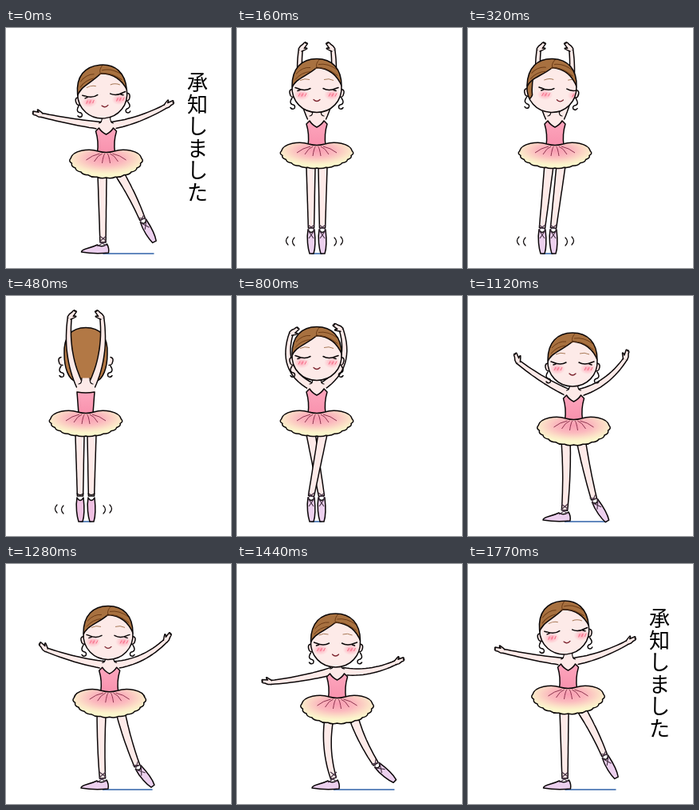
Animation of 282x300 px, one loop 1.93 s. Source, as an HTML page:

```html
<!DOCTYPE html>
<html lang="ja">
<head>
<meta charset="utf-8">
<title>承知しました</title>
<style>
  html, body { margin: 0; width: 100%; height: 100%; overflow: hidden; background: #fff; }
  svg { display: block; width: 100vw; height: 100vh; }
  text { font: 400 26px "Noto Sans CJK JP", "Noto Sans CJK", sans-serif; text-anchor: middle; fill: #000; }
  .ink { stroke: #0b0708; stroke-width: 1.5; stroke-linecap: round; stroke-linejoin: round; }
  .thin { fill: none; stroke: #0b0708; stroke-width: 1.2; stroke-linecap: round; }
  .lace { fill: none; stroke: #4a3648; stroke-width: 1.2; }
  .lip { fill: none; stroke: #7d2630; stroke-width: 1.3; stroke-linecap: round; }
</style>
</head>
<body>
<svg id="stage" viewBox="0 0 282 300">
  <defs>
    <radialGradient id="skirt" cx=".5" cy=".3" r=".56">
      <stop offset="0" stop-color="#f99cb2"/>
      <stop offset=".45" stop-color="#fbb9be"/>
      <stop offset=".8" stop-color="#fce3c8"/>
      <stop offset="1" stop-color="#fcf6cc"/>
    </radialGradient>
    <radialGradient id="blush">
      <stop offset="0" stop-color="#ff9fb2"/>
      <stop offset="1" stop-color="#ffb0be" stop-opacity="0"/>
    </radialGradient>
    <linearGradient id="top" x2="0" y2="1">
      <stop offset="0" stop-color="#fda6bd"/>
      <stop offset="1" stop-color="#f891ad"/>
    </linearGradient>
    <clipPath id="face"><path/></clipPath>
  </defs>
</svg>
<script>
const SKIN = '#fdeae8', HAIR = '#a87140', SHOE = '#ecd0ee';
const FACE = 'M-31 0C-31-22-19-34 0-34S31-22 31 0C32 19 18 33 0 33S-32 19-31 0Z';
const UPPER = 36, FORE = 38, SHOE_LENGTH = 32, LOOP = 1930;

// arms: upper, fore and hand angles in degrees above the horizontal, then stretch
// legs: hip offset, ankle x, ankle y, knee bend; toe turns the right foot
const reach = {
  head: [120.5, 80, -5], waist: [125.5, 154], drop: 35, turn: 2,
  arms: [[8, 12, 15, 1.02], [13, 26, 28, .98]],
  legs: [[-5, 121.5, 268, 0], [16, 171, 239, 2]], toe: -27, flat: true, label: true
};
const pointe = {
  head: [100, 72.5, 0], waist: [100, 145], drop: 32,
  arms: [[70, 92, 130, 1.2], [70, 92, 130, 1.2]],
  legs: [[-7.5, 93, 250, 0], [7.5, 107, 250, 0]], toe: 0, wobble: true
};
const crossed = {
  ...pointe, wobble: false,
  arms: [[39, 98, 142, 1.1], [44, 98, 146, 1.14]],
  legs: [[-7.5, 106, 250, 0], [7.5, 93, 250, 0]]
};
const open = {
  head: [131, 80, 0], waist: [132.5, 153], drop: 35,
  arms: [[27, 36, 70, 1], [22, 50, 75, 1]],
  legs: [[-10, 121, 268, 2], [9, 158, 254, -1]], toe: -30, flat: true
};
const bow = {
  head: [123.5, 96, 0], waist: [125.5, 166], drop: 35,
  arms: [[-14, -7, 8, 1.05], [-2, 20, 24, .93]],
  legs: [[-10, 121, 268, -6], [21, 174, 250, -3]], toe: -47, flat: true
};

function mix(a, b, k) {
  if (typeof b === 'number') return (a ?? b) + (b - (a ?? b)) * k;
  if (Array.isArray(b)) return b.map((v, i) => mix(a[i], v, k));
  if (typeof b !== 'object') return b;
  return Object.fromEntries(Object.keys(b).map(n => [n, mix(a[n], b[n], k)]));
}

const steps = [
  [0, reach], [160, pointe], [320, { ...pointe, turn: 11, waist: [109, 145], head: [105, 72.5, 2] }],
  [480, { ...pointe, back: true }], [640, { ...pointe, turn: -11 }], [800, crossed],
  [960, mix(crossed, open, .45)], [1120, open], [1280, mix(open, bow, .4)], [1440, bow], [1770, reach]
];

const f = v => v.toFixed(1);
const rad = deg => deg * Math.PI / 180;
const path = (d, fill = 'none', cls = '', more = '') => `<path d="${d}" fill="${fill}" class="${cls}" ${more}/>`;
const place = (x, y, rot, body) => `<g transform="translate(${f(x)} ${f(y)}) rotate(${f(rot)})">${body}</g>`;
const flip = (side, body) => `<g transform="scale(${side} 1)">${body}</g>`;

// Tapered limb bent smoothly through its middle joint
function limb(a, joint, b, w0, w1) {
  const ctrl = [0, 1].map(i => 2 * joint[i] - (a[i] + b[i]) / 2);
  const soft = [0, 1].map(i => (joint[i] + ctrl[i]) / 2);
  const left = [], right = [];
  for (let t = 0; t <= 1; t += 1 / 16) {
    const at = i => (1 - t) ** 2 * a[i] + 2 * t * (1 - t) * soft[i] + t * t * b[i];
    const slope = i => (1 - t) * (soft[i] - a[i]) + t * (b[i] - soft[i]);
    const w = (w0 + (w1 - w0) * t) / Math.hypot(slope(0), slope(1));
    const nx = -slope(1) * w, ny = slope(0) * w;
    left.push(f(at(0) + nx) + ' ' + f(at(1) + ny));
    right.unshift(f(at(0) - nx) + ' ' + f(at(1) - ny));
  }
  return path('M' + left.concat(right).join('L'), SKIN, 'ink');
}

function arm([wx, wy], side, [upper, fore, hand, k]) {
  const step = ([x, y], deg, len) => [x + side * Math.cos(rad(deg)) * len * k, y - Math.sin(rad(deg)) * len * k];
  const shoulder = [wx + side * 7, wy - 32];
  const elbow = step(shoulder, upper, UPPER), wrist = step(elbow, fore, FORE);
  const palm = path('M-1-2.5C2-4 4-5 6-5.500Q7-4.500 4-2.500L11-2Q12-.5 10 0L11 1Q10 2.500 7 2L3 3-1 2.500', SKIN, 'ink');
  return limb(shoulder, elbow, wrist, 4.6, 2.5) +
    place(...wrist, 0, flip(side, place(0, 0, -hand, palm)));
}

function pointShoe(back) {
  const shoe = path(`M-4 2C-6 13-4 26-2 ${SHOE_LENGTH}H3C6 23 5 11 4 2Q0 9-4 2Z`, back ? '#efc0e2' : SHOE, 'ink');
  return shoe + (back ? path('M-4-3Q0 0 4-3', 'none', 'thin')
    : path('M-4-4L4 2M4-4L-4 2M-4 3L3 13M4 3L-3 13', 'none', 'lace'));
}

const flatShoe = () => path('M-27 12C-27 8-17 8-7 3Q-1 7 5 2Q8 7 7 13Q-10 15-27 12Z', SHOE, 'ink') +
  path('M-4-8L4-2M4-8L-4-1M-4-1L4 4M4-2L-7 5', 'none', 'lace');

function leg([wx, wy], [hip, x, y, bend], toe, shoe) {
  const a = [wx + hip, wy + 27];
  const knee = [(a[0] + x) / 2 + bend, (a[1] + y) / 2];
  return limb(a, knee, [x, y], 5.6, 3.6) + place(x, y, toe, shoe);
}

function tutu(drop) {
  const n = 12, r = 44.5, depth = drop - 11;
  const rim = (i, k) => {
    const a = Math.PI * i / n;
    return f(-r * k * Math.cos(a)) + ' ' + f(9 + depth * k * Math.sin(a));
  };
  let d = `M-10 0C-22-4-42-1-${r} 9`, folds = '';
  for (let i = 1; i <= n; i++) d += `Q${rim(i - .5, 1.08)} ${rim(i, 1)}`;
  for (let x = -25; x <= 25; x += 10) folds += `M${f(x * .32)} 3Q${f(x * .7)} 5 ${x} ${f(16 - Math.abs(x) * .2)}`;
  return path(d + 'C42-1 22-4 10 0Q0 3-10 0Z', 'url(#skirt)', 'ink') + path(folds, 'none', '', 'stroke="#8f3550"');
}

const bodice = back => path(back ? 'M-11-25Q0-23 11-25L9 2Q0 4-9 2Z'
  : 'M-13-25L-9-29Q-6-24 0-21Q6-24 9-29L13-25Q9-12 11 2Q0 5-11 2Q-9-12-13-25Z', 'url(#top)', 'ink');

function chest(neck) {
  const side = `M-5 ${f(-neck)}Q-5-35-9-35`;
  return path(`M-5 ${f(-neck)}L-6-35-12-30-12-22H12V-30L6-35 5 ${f(-neck)}Z`, SKIN) +
    path(side, 'none', 'thin') + flip(-1, path(side, 'none', 'thin'));
}

function head(turn, back) {
  const pair = draw => draw(1) + draw(-1);
  const ears = pair(s => flip(s, path('M-31 4Q-36 5-33 12Q-32 14-29 14', SKIN, 'ink') +
    path('M-31 15Q-35 21-31 23Q-26 24-28 28Q-31 30-33 27', 'none', 'ink')));
  if (back) return ears + path('M-27 0C-28-22-18-33 0-33S28-22 27 0C27 16 22 33 12 34H-12C-22 33-27 16-27 0Z', '#b27845', 'ink');

  const features = pair(s => flip(s, '<ellipse cx="-19" cy="11" rx="10" ry="7" fill="url(#blush)"/>' +
    path('M-24 3Q-15 7-8 3M-24 3L-27 2M-21 5L-24 6', 'none', 'ink') + path('M-21-7Q-15-10-9-8', 'none', '', 'stroke="#a87a58"')) +
    path([-4, 0, 4].map(x => `M${x - s * 19} 13l2-4`).join(''), 'none', '', 'stroke="#f4627f" stroke-width=".9"'));
  const look = place(turn, 0, 0, features + path('M-4 17Q0 21 4 17', 'none', 'lip'));
  const side = Math.abs(turn) > 5
    ? flip(Math.sign(turn), path('M-50-40H-16Q-27-8-24 12Q-27 22-50 26Z', HAIR, 'ink')) : '';
  const hair = path('M-50-40V4H-32C-27-10-14-11 0-23C14-22 26-14 32 2H50V-40Z', HAIR, 'ink') +
    path('M0-23Q-2-28 4-34M-2-22Q10-26 26-13M2-27Q14-29 26-20M-8-18Q-20-17-27-8M-8-23Q-18-24-26-15', 'none', '', 'stroke="#6e3d18"');
  return ears + path(FACE, SKIN) + `<g clip-path="url(#face)">${look}${side}${hair}</g>` + path(FACE, 'none', 'ink');
}

const label = () => [...'承知しました'].map((c, i) => `<text x="240" y="${f(77 + i * 27.6)}">${c}</text>`).join('');

function wobble() {
  const arc = (x, y) => path(`M${x} ${y}q5 5 0 10`, 'none', 'thin');
  return place(97, 0, 0, [1, -1].map(s => flip(s, arc(25, 262) + arc(33, 261))).join(''));
}

function floor({ legs: [l, r], toe }) {
  const tip = r[1] - SHOE_LENGTH * Math.sin(rad(toe));
  return path(`M${f(l[1])} 282H${f(tip)}`, 'none', '', 'stroke="#2f62a8" stroke-width="1.500"');
}

function figure(p) {
  const [hx, hy, tilt] = p.head, [wx, wy] = p.waist;
  const arms = arm(p.waist, -1, p.arms[0]) + arm(p.waist, 1, p.arms[1]);
  const legs = leg(p.waist, p.legs[0], 0, p.flat ? flatShoe() : pointShoe(p.back)) +
    leg(p.waist, p.legs[1], p.toe, pointShoe(p.back));
  const skull = place(hx, hy, tilt, head(p.turn || 0, p.back));
  const torso = place(wx, wy, 0, chest(wy - hy - 30) + bodice(p.back));
  return floor(p) + legs + (p.back ? skull + arms + torso : arms + torso + skull) +
    place(wx, wy, 0, tutu(p.drop)) + (p.wobble ? wobble() : '') + (p.label ? label() : '');
}

const stage = document.getElementById('stage');
document.querySelector('#face path').setAttribute('d', FACE);
const layers = steps.map(([, pose]) => {
  const g = document.createElementNS('http://www.w3.org/2000/svg', 'g');
  g.innerHTML = figure(pose);
  stage.append(g);
  return g;
});

const start = performance.now();
function tick(now) {
  const t = Math.max(0, now - start) % LOOP;
  const current = steps.findLastIndex(([at]) => at <= t);
  layers.forEach((g, i) => { g.style.display = i === current ? '' : 'none'; });
  requestAnimationFrame(tick);
}
tick(start);
</script>
</body>
</html>
```
